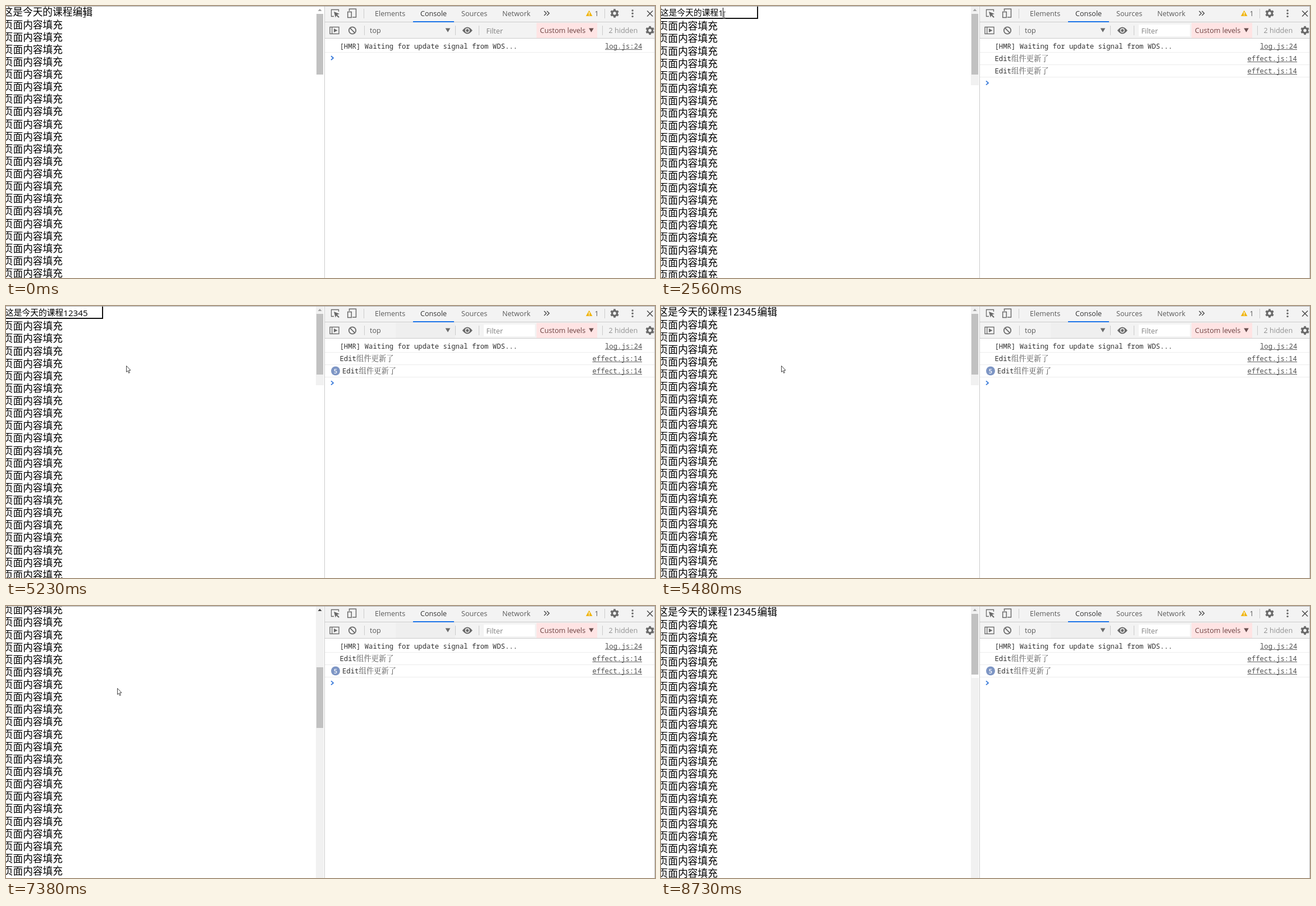
An HTML page with a canvas for the animation above (8980 ms loop, 1156 by 484 pixels).

```html
<!DOCTYPE html>
<html lang="zh">
<head>
<meta charset="utf-8">
<title>Edit effect demo</title>
<style>
html, body { margin: 0; width: 100%; height: 100%; overflow: hidden; background: #fff; }
canvas { display: block; }
</style>
</head>
<body>
<canvas id="stage" width="1156" height="484"></canvas>
<script>
const ctx = document.getElementById('stage').getContext('2d', { alpha: false });
const LOOP = 8980, W = 1156, H = 484;
const ROW = 22.13, PAGE = 17.7, INPUT = 14.75;
const CJK = '"Noto Sans CJK SC", "Noto Sans CJK", sans-serif';
const UI = '"Open Sans", "Noto Sans", sans-serif';
const MONO = '"Noto Sans Mono", "DejaVu Sans Mono", monospace';
const GREY = '#6a6a6a', LINE = '#cbcbcb';

const EDIT_START = 660, FOCUS = 2060, EDIT_END = 5480;
const KEYS = [2560, 3090, 3620, 4050, 4570];

// time, x, y, shape: i = text beam (centre), a = arrow (tip), '' = hidden
const POINTER = [
  [0, 139.5, 14.5, 'i'], [1220, 92.5, 15, 'i'], [1340, 54.5, 14, 'i'],
  [1480, 61.5, 10, 'i'], [1640, 98.5, 7.5, 'i'], [1790, 107.5, 12, 'i'],
  [1910, 112.5, 16.5, 'i'], [4690, 150, 46, 'a'], [4810, 194, 88, 'a'],
  [4930, 213, 105, 'a'], [5080, 213, 104, 'a'], [5230, 214, 106, 'a'],
  [6440, 211, 80, 'a'], [6570, 206, 56, 'a'], [6870, 193, 92, 'a'],
  [7000, 186, 129, 'a'], [7140, 198, 146, 'a'], [7930, 208, 146, 'a'],
  [8080, 330, 198, 'a'], [8200, 525, 265, 'a'], [8320, 679, 324, 'a'],
  [8460, 655, 338, 'a'], [8580, 629, 352, 'a'], [8730, 0, 0, '']
];
const SCROLL = [[0, 0], [7260, 220], [7380, 446.7], [7810, 220], [7930, 0]];

const at = (list, t) => list.filter(k => k[0] <= t).pop();

function box(x, y, w, h, color) {
  ctx.fillStyle = color;
  ctx.fillRect(x, y, w, h);
}

function text(str, x, mid, size, family, color, weight = 400) {
  ctx.font = `${weight} ${size}px ${family}`;
  ctx.fillStyle = color;
  ctx.fillText(str, x, mid + size * 0.37);
}

const cjk = (str, x, mid, size) => text(str, x, mid, size, CJK, '#000');
const digits = (str, x, mid, size) => text(str, x, mid, size * 1.026, UI, '#000');
const ui = (str, x, mid, color = '#5a5a5a') => text(str, x, mid, 12.6, UI, color);
const mono = (str, x, mid, color = '#303030') => text(str, x, mid, 12.27, MONO, color);

function path(points, close) {
  ctx.beginPath();
  for (let i = 0; i < points.length; i += 2) ctx.lineTo(points[i], points[i + 1]);
  if (close) ctx.closePath();
}

function line(color, width, ...points) {
  path(points);
  ctx.strokeStyle = color;
  ctx.lineWidth = width;
  ctx.stroke();
}

function shape(color, ...points) {
  path(points, true);
  ctx.fillStyle = color;
  ctx.fill();
}

function dot(x, y, r, color) {
  ctx.beginPath();
  ctx.arc(x, y, r, 0, Math.PI * 2);
  ctx.fillStyle = color;
  ctx.fill();
}

function ring(x, y, r, width, color) {
  ctx.beginPath();
  ctx.arc(x, y, r, 0, Math.PI * 2);
  ctx.strokeStyle = color;
  ctx.lineWidth = width;
  ctx.stroke();
}

function frameBox(x, y, w, h, width, color) {
  ctx.strokeStyle = color;
  ctx.lineWidth = width;
  ctx.strokeRect(x, y, w, h);
}

function gear(x, y) {
  ring(x, y, 4.4, 3.4, GREY);
  for (let i = 0; i < 6; i++) {
    const a = i * Math.PI / 3 + Math.PI / 6, c = Math.cos(a), s = Math.sin(a);
    line(GREY, 3.6, x + c * 5, y + s * 5, x + c * 7.7, y + s * 7.7);
  }
}

const triangle = (x, y, color) => shape(color, x - 4.3, y - 3.5, x + 4.3, y - 3.5, x, y + 3.8);
const separator = (x, y) => box(x, y, 1, 17, LINE);

function drawPage(t, typed) {
  const editing = t >= EDIT_START && t < EDIT_END;
  const scroll = at(SCROLL, t)[1];
  const first = (editing ? 35.7 : 33) - scroll;
  const value = '12345'.slice(0, typed);

  if (editing) {
    const focused = t >= FOCUS;
    if (focused) frameBox(-8, -3, 180, 25, 2, '#101010');
    else frameBox(-8, -3, 178.5, 24.5, 1, '#767676');
    cjk('这是今天的课程', -1, 12, INPUT);
    digits(value, 102.3, 12, INPUT);
    if (focused && t < 5230) box(Math.floor(102.3 + 8.66 * typed), 3, 1, 17, '#000');
  } else {
    cjk('这是今天的课程', -5.4, 10.5 - scroll, PAGE);
    digits(value, 118.5, 10.5 - scroll, PAGE);
    cjk('编辑', typed ? 171.5 : 118.7, 10.5 - scroll, PAGE);
  }
  for (let i = 0; i < 60; i++) {
    const y = first + i * ROW;
    if (y > -20 && y < H + 20) cjk('页面内容填充', -5.2, y, PAGE);
  }

  if (t >= 7260) box(552, 1, 14, 483, '#f1f1f1');
  else if (t >= 2560) box(552, 1, 14, 140, '#f1f1f1');
  if (t >= 7930) box(553, 122, 13, 6, '#fcfcfc');
  box(553, 14 + scroll * 0.2127, 12, 108, '#c1c1c1');
  shape(scroll ? '#404040' : '#a3a3a3', 555.5, 9, 562.5, 9, 559, 5);
}

function drawTabs() {
  box(568, 1, 587, 27, '#f3f3f3');
  box(568, 28, 587, 1, LINE);

  line(GREY, 1.3, 584, 18.5, 579.5, 18.5, 579.5, 6.5, 592.5, 6.5, 592.5, 10);
  shape(GREY, 584, 10, 594, 14, 589.8, 15.6, 593.8, 19.6, 592.3, 21, 588.4, 17, 586.8, 20.5);
  line(GREY, 1.5, 611.5, 9, 611.5, 5.2, 623.5, 5.2, 623.5, 20, 617, 20);
  frameBox(608.7, 10.5, 6.6, 10, 1.5, GREY);
  separator(637, 5);

  ui('Elements', 657, 13.5);
  ui('Console', 738, 13.5, '#333');
  ui('Sources', 811, 13.5);
  ui('Network', 884, 13.5);
  box(725, 27, 73, 2, '#1a73e8');
  for (const x of [958.5, 963.5]) line('#505050', 1.5, x, 9, x + 4, 13, x, 17);

  shape('#f0b50f', 1038.7, 7.7, 1044.5, 18, 1032.9, 18);
  box(1038, 11, 1.4, 3.6, '#fff');
  box(1038, 15.5, 1.4, 1.4, '#fff');
  ui('1', 1048.5, 13.5);
  separator(1066, 5);
  gear(1084, 13);
  for (const y of [8, 13.3, 18.6]) dot(1116, y, 1.7, GREY);
  line('#505050', 1.6, 1142, 8.5, 1152, 18.5);
  line('#505050', 1.6, 1152, 8.5, 1142, 18.5);
}

function drawFilters(t) {
  box(568, 29, 587, 28, '#f3f3f3');
  if (t >= 3090) box(694, 30, 106, 27, '#efefef');
  box(568, 57, 587, 1, LINE);
  box(725, 28, 73, 1, '#1a73e8');

  frameBox(577, 37.5, 16, 12, 1.4, GREY);
  line(GREY, 1.3, 580.7, 37.5, 580.7, 49.5);
  shape(GREY, 584, 40, 590.5, 43.5, 584, 47);
  ring(617, 43.5, 6.2, 1.8, GREY);
  line(GREY, 1.8, 612.7, 39.2, 621.3, 47.8);
  separator(638, 35);
  ui('top', 648, 43.5);
  triangle(787, 43, GREY);
  separator(800, 35);

  ctx.beginPath();
  ctx.moveTo(812.8, 43.5);
  ctx.quadraticCurveTo(821.8, 31.5, 830.8, 43.5);
  ctx.quadraticCurveTo(821.8, 55.5, 812.8, 43.5);
  ctx.fillStyle = GREY;
  ctx.fill();
  ring(821.8, 43.5, 3.3, 1.5, '#f3f3f3');
  separator(842, 35);

  if (t >= 2560) box(851, 33, 91, 21, '#fff');
  ui('Filter', 855.5, 44, '#808080');
  box(945, 30, 108, 27, '#ffe4e4');
  ui('Custom levels', 951, 43.5, '#6e4343');
  triangle(1042.5, 43, '#6b5050');
  separator(1062, 35);
  ui('2 hidden', 1073.5, 43.5, '#929292');
  gear(1147, 43.5);
}

function link(str, x, mid) {
  mono(str, x, mid, '#505050');
  box(x, Math.round(mid + 5), 1133 - x, 1, '#606060');
}

function logRow(index, count) {
  const mid = 71.5 + index * 22, x = count > 1 ? 599 : 594.5;
  if (count > 1) {
    dot(587, mid, 8, '#7d95c4');
    text(String(count), 583.7, mid, 11, UI, '#fff', 600);
  }
  mono('Edit', x, mid);
  text('组件更新了', x + 29.5, mid, 13.3, '"Noto Serif CJK SC", ' + CJK, '#555', 300);
  link('effect.js:14', 1044.5, mid);
  box(568, Math.round(mid + 10), 587, 1, '#ececec');
}

function drawConsole(t, typed) {
  const rows = t < EDIT_START ? 0 : typed ? 2 : 1;
  mono('[HMR] Waiting for update signal from WDS...', 594.5, 71.5);
  link('log.js:24', 1067, 71.5);
  box(568, 82, 587, 1, '#ececec');
  if (rows > 0) logRow(1, 1);
  if (rows > 1) logRow(2, typed);
  const y = 92.5 + rows * 22.2;
  line('#3879d9', 1.8, 579, y - 3.5, 583, y, 579, y + 3.5);
}

function drawPointer(t) {
  const [, x, y, kind] = at(POINTER, t);
  if (kind === 'i') {
    line('#555', 1, x, y - 5.5, x, y + 5.5);
    line('#555', 1, x - 2.5, y - 6, x + 2.5, y - 6);
    line('#555', 1, x - 2.5, y + 6, x + 2.5, y + 6);
  } else if (kind === 'a') {
    path([0.5, 0.5, 0.5, 11.5, 2.9, 9.3, 4.6, 13.4, 6.3, 12.6, 4.7, 8.6, 7.9, 8.3]
      .map((v, i) => v + (i % 2 ? y : x)), true);
    ctx.fillStyle = '#fff';
    ctx.fill();
    ctx.strokeStyle = '#444';
    ctx.lineWidth = 1;
    ctx.stroke();
  }
}

function draw(t) {
  const typed = KEYS.filter(k => k <= t).length;
  box(0, 0, W, H, '#fff');
  drawPage(t, typed);
  box(567, 1, 1, 483, LINE);
  drawTabs();
  drawFilters(t);
  drawConsole(t, typed);
  box(1155, 1, 1, 483, '#bdbdbd');
  box(0, 0, W, 1, '#ababab');
  drawPointer(t);
}

const start = performance.now();
function tick() {
  draw((performance.now() - start) % LOOP);
  requestAnimationFrame(tick);
}
tick();
</script>
</body>
</html>
```
